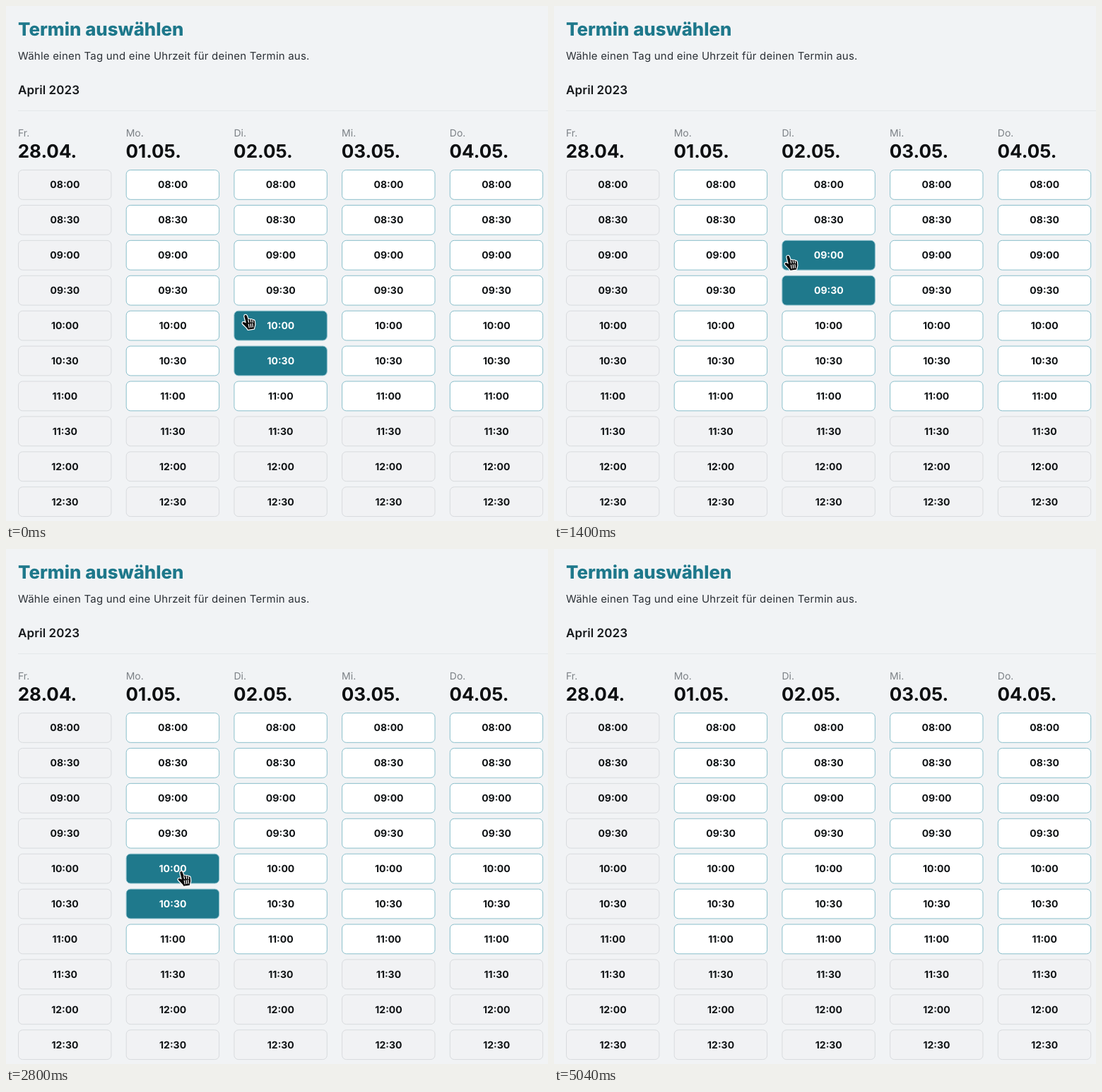
Recreate the animation shown at these times as an HTML page. Size 767x730 px, loop 5110 ms.

```html
<!DOCTYPE html>
<html lang="de">
<head>
<meta charset="utf-8">
<title>Termin auswählen</title>
<style>
  html, body { margin: 0; width: 100%; height: 100%; overflow: hidden; background: #f1f3f5; }
  svg { display: block; width: 767px; height: 730px; font-family: Inter, sans-serif; text-rendering: geometricPrecision; }
  .title { font-size: 25.8px; font-weight: 800; fill: #1e788b; }
  .intro { font-size: 15px; letter-spacing: .21px; fill: #2b3036; }
  .month { font-size: 17px; font-weight: 600; letter-spacing: .1px; fill: #15181b; }
  .day { font-size: 14px; fill: #7c8186; }
  .date { font-size: 26px; font-weight: 700; fill: #0d0f11; }
  .slot rect { fill: #f1f2f4; stroke: #d8dbde; }
  .slot text { font-size: 14px; font-weight: 700; text-anchor: middle; fill: #111416; }
  .slot.open rect { fill: #fff; stroke: #8abfcb; }
  .slot.on rect { fill: #1f798c; }
  .slot.on text { fill: #fff; }
  .shape { fill: #0a0a0a; stroke: #fff; stroke-width: 2.4; stroke-linejoin: round; paint-order: stroke; }
  .knuckles { fill: none; stroke: #fff; stroke-width: 1.2; stroke-linecap: round; }
</style>
</head>
<body>
<svg viewBox="0 0 767 730">
  <text class="title" x="17" y="42">Termin auswählen</text>
  <text class="intro" x="17" y="76">Wähle einen Tag und eine Uhrzeit für deinen Termin aus.</text>
  <text class="month" x="17" y="125">April 2023</text>
  <path d="M17 148.5H767" stroke="#e4e7e9"/>
  <g id="calendar"></g>
  <g id="cursor">
    <path id="arrow" class="shape" d="M0 0V16.5L3.8 13L6.4 19.2L9.2 18.1L6.8 12H12.3Z"/>
    <g id="hand">
      <path class="shape" d="M-1.7 1.7C-1.6 -.3 1 -.6 1.8 1.2L3.7 6.6C4.6 5.5 6.5 5.6 7 6.9C8 5.9 9.6 6.2 10 7.4C11.2 6.7 12.6 7.5 12.8 9L13.2 13.2C13.3 15.5 12 16.6 12 19.5L3.4 20.8C2.5 18.2 -.6 16 -3.8 12.6C-5.2 11 -3.6 9.3 -1.8 10.2L.8 11.6Z"/>
      <path class="knuckles" d="M4.3 13L5.2 17.8M7.1 12.6L7.8 17.4M9.8 12.2L10.3 17M3.8 7L4.6 10.4M7.1 7.2L7.7 10.2M10 7.8L10.5 10.4"/>
    </g>
  </g>
</svg>
<script>
const LOOP = 5110, TICK = 70;
const LEFT = 17.5, TOP = 232.5, COL = 152.7, ROW = 49.92, WIDTH = 131.4, HEIGHT = 41.8;
const DAYS = [['Fr.', '28.04.'], ['Mo.', '01.05.'], ['Di.', '02.05.'], ['Mi.', '03.05.'], ['Do.', '04.05.']];
const LAST_OPEN = 6, LAST_START = 5;
const firstStart = { 1: 4, 2: 0 };

// Pointer path: time, x, y
const PATH = [
  [0, 339, 438], [840, 377, 363], [1750, 295, 358], [2380, 248, 384],
  [2800, 248, 457], [3640, 252, 520], [4200, 260, 600], [4690, 275, 745]
];

const byId = id => document.getElementById(id);
const calendar = byId('calendar'), cursor = byId('cursor'), arrow = byId('arrow'), hand = byId('hand');

function add(parent, tag, attrs, text = '') {
  const el = document.createElementNS(parent.namespaceURI, tag);
  for (const key in attrs) el.setAttribute(key, attrs[key]);
  el.textContent = text;
  return parent.appendChild(el);
}

const timeLabel = row =>
  String(8 + Math.floor(row / 2)).padStart(2, '0') + (row % 2 ? ':30' : ':00');

const slots = DAYS.map(([day, date], col) => {
  const x = LEFT + col * COL;
  add(calendar, 'text', { class: 'day', x: x - .5, y: 185 }, day);
  add(calendar, 'text', { class: 'date', x: x - .8, y: 215 }, date);
  return Array.from({ length: 10 }, (_, row) => {
    const y = TOP + row * ROW;
    const open = col > 0 && row <= LAST_OPEN;
    const slot = add(calendar, 'g', { class: open ? 'slot open' : 'slot' });
    add(slot, 'rect', { x, y, width: WIDTH, height: HEIGHT, rx: 6 });
    add(slot, 'text', { x: x + WIDTH / 2 + .2, y: y + 25.8 }, timeLabel(row));
    return slot;
  });
});

// Velocity along one axis at a path point, taken from its neighbours.
function velocity(i, axis) {
  const a = PATH[Math.max(i - 1, 0)], b = PATH[Math.min(i + 1, PATH.length - 1)];
  return (b[axis] - a[axis]) / (b[0] - a[0]);
}

// Smooth curve through the path points, without stopping at them.
function pointerAt(t) {
  const end = PATH.findIndex(p => p[0] > t);
  if (end < 0) return null;
  const a = PATH[end - 1], b = PATH[end];
  const span = b[0] - a[0], k = (t - a[0]) / span;
  const ease = k * k * (3 - 2 * k);
  return [1, 2].map(axis =>
    a[axis] + (b[axis] - a[axis]) * ease
    + span * k * (1 - k) * ((1 - k) * velocity(end - 1, axis) - k * velocity(end, axis)));
}

// A booking covers two consecutive slots, beginning at the hovered one.
function hoveredSlot([x, y]) {
  const col = Math.floor((x - LEFT) / COL), row = Math.floor((y - TOP) / ROW);
  const inside = x - LEFT - col * COL <= WIDTH && y - TOP - row * ROW <= HEIGHT;
  return inside && row >= firstStart[col] && row <= LAST_START ? [col, row] : null;
}

const show = (el, visible) => el.setAttribute('visibility', visible ? 'visible' : 'hidden');

function draw(now) {
  const t = Math.floor((now % LOOP) / TICK) * TICK;
  const point = pointerAt(t);
  const hover = point && hoveredSlot(point);
  slots.forEach((list, col) => list.forEach((slot, row) =>
    slot.classList.toggle('on', !!hover && col === hover[0] && (row === hover[1] || row === hover[1] + 1))));
  show(arrow, point && !hover);
  show(hand, point && hover);
  if (point) cursor.setAttribute('transform', `translate(${point})`);
}

const start = performance.now();
function frame() {
  draw(performance.now() - start);
  requestAnimationFrame(frame);
}
frame();
</script>
</body>
</html>
```
